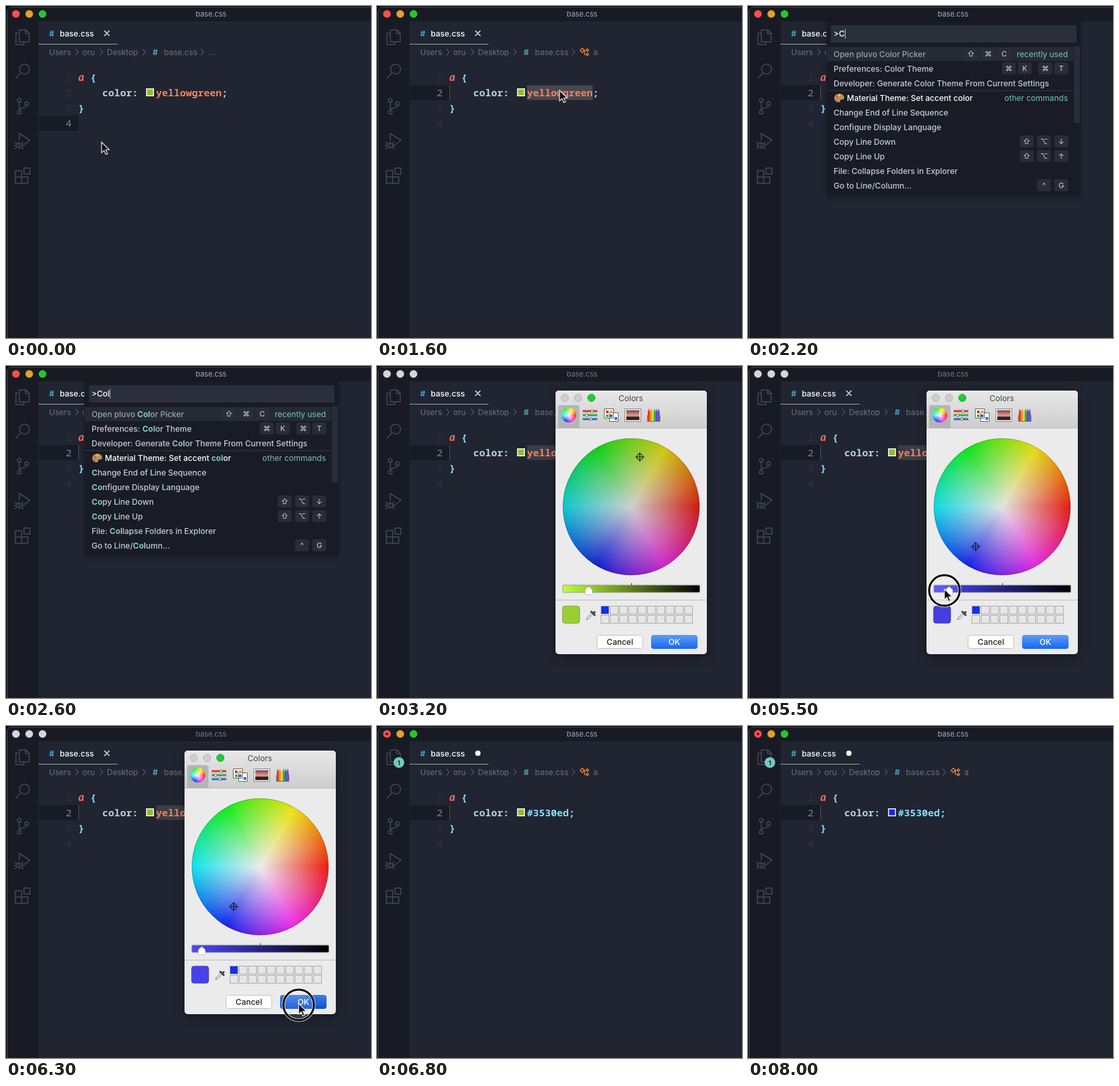
These frames come from a looping animation (550 by 500 pixels, 8.1 s). An HTML page:

```html
<!DOCTYPE html>
<html lang="en">
<head>
<meta charset="utf-8">
<title>Color picker in an editor</title>
<style>
  html, body { margin: 0; width: 100%; height: 100%; overflow: hidden; background: #000; }
  svg { display: block; }
  text { font: 12px Inter, "DejaVu Sans", sans-serif; white-space: pre; }
  .mid { text-anchor: middle; }
  .end { text-anchor: end; }
  .code text { font: 600 15px "Noto Sans Mono", "DejaVu Sans Mono", monospace; }
  .code #numbers text { font-weight: 400; }
  .code .tag { font: italic 700 17px Lato, sans-serif; }
  .crumbs { fill: #6b7185; }
  .line { fill: none; stroke-width: 1.5; stroke-linejoin: round; stroke-linecap: round; }
  .label { font-weight: 500; }
  .hit { fill: #80cbc4; font-weight: 700; }
  .plain .hit { fill: inherit; font-weight: inherit; }
  .key { font-size: 11px; fill: #d3d8e4; }
  .shadow { filter: drop-shadow(0 4px 8px rgb(0 0 0 / .35)); }
  #paletteBox { filter: drop-shadow(0 1px 3px rgb(0 0 0 / .25)); }
  .wheel {
    border-radius: 50%; width: 100%; height: 100%;
    background:
      linear-gradient(rgb(0 0 0 / var(--dark, 0)) 0 100%),
      radial-gradient(closest-side, #fff, transparent),
      conic-gradient(from 90deg, #ff1e10, #ff2cf8, #1426ff, #10f4ff, #10ff18, #fff410, #ff1e10);
  }
</style>
</head>
<body>
<svg width="550" height="500" viewBox="0 0 550 500">
  <defs>
    <linearGradient id="bar" x2="0" y2="1"><stop stop-color="#e8e8e8"/><stop offset="1" stop-color="#cdcdcd"/></linearGradient>
    <linearGradient id="ok" x2="0" y2="1"><stop stop-color="#5c9df8"/><stop offset="1" stop-color="#1967f2"/></linearGradient>
    <linearGradient id="okDown" x2="0" y2="1"><stop stop-color="#3a7ee6"/><stop offset="1" stop-color="#0c50d2"/></linearGradient>
    <linearGradient id="ramp"><stop id="rampStart"/><stop offset="1" stop-color="#000"/></linearGradient>
    <linearGradient id="sunset" x2="0" y2="1"><stop stop-color="#5d3b66"/><stop offset=".55" stop-color="#f2a07a"/><stop offset=".7" stop-color="#2b2028"/></linearGradient>
  </defs>

  <!-- editor window -->
  <path d="M1.5 510V7.500a6 6 0 0 1 6-6H560V510Z" fill="#202531" stroke="#4b4f5a"/>
  <path d="M2 500V7.500a5.500 5.500 0 0 1 5.500-5.500H550V23H49V500Z" fill="#181a24"/>
  <g id="lights"></g>
  <text id="title" class="mid" x="309" y="16" style="font-size:11px">base.css</text>

  <g class="line" stroke="#454958">
    <path d="M20 41h-5v17h12v-4M20 36h10l5 5v13h-15zM29.500 36v5.500h5.500"/>
    <circle cx="28" cy="95" r="7.500"/><path d="M22.500 100.500L15 109"/>
    <circle cx="20" cy="142" r="2.800"/><circle cx="31" cy="147" r="2.800"/><circle cx="20" cy="160" r="2.800"/>
    <path d="M20 145v12M31 150c0 5-11 2-11 7"/>
    <path d="M20 202v-10l16 10-10 8"/><circle cx="19.500" cy="210" r="4"/>
    <path d="M19.500 206v8M13 205l3 2.500M26 205l-3 2.500M12.500 210h3M23.500 210h3M13 215l3-2.500M26 215l-3-2.500"/>
    <path d="M14 248h9.500v19h-9.500zM14 257.500h19v9.500h-9.500M27 244h9v9h-9z"/>
  </g>
  <g id="badge"><circle cx="33" cy="55" r="8" fill="#72c9bf"/><text class="mid" x="33" y="58.500" fill="#16202a" style="font-size:9px;font-weight:700">1</text></g>

  <rect x="49" y="57" width="119" height="1" fill="#8fa5a6"/>
  <text x="65" y="46" fill="#4aa3c7" style="font-weight:700">#</text>
  <text x="81" y="46" fill="#fff" class="label">base.css</text>
  <path id="close" class="line" d="M148.500 37.500l7 7m0-7l-7 7" stroke="#dfe3ea"/>
  <circle id="dirty" cx="152" cy="41" r="4" fill="#fff"/>

  <g class="crumbs">
    <text x="65" y="74">Users</text><text x="115" y="74">oru</text><text x="152" y="74">Desktop</text>
    <text x="221" y="74" fill="#4aa3c7" style="font-weight:700">#</text><text x="238" y="74">base.css</text>
    <path class="line" d="M105 65l4 4.500-4 4.500M142 65l4 4.500-4 4.500M206 65l4 4.500-4 4.500M294 65l4 4.500-4 4.500" stroke="#6b7185" style="stroke-width:1"/>
    <text id="dots" x="305" y="74">...</text>
    <g id="symbol">
      <path class="line" d="M306 67l3.500-3.500 3 3-3.500 3.500zM311 67h4M312.500 67v6h2M315 66.500l2-2 2 2-2 2zM315 73l2-2 2 2-2 2z" stroke="#ee8b33" style="stroke-width:1.200"/>
      <text x="326" y="74">a</text>
    </g>
  </g>

  <g class="code">
    <rect id="current" x="50" width="59" height="23" fill="#181b25"/>
    <g id="numbers" class="end"></g>
    <rect id="guide" x="109" y="119" width="1" height="23" fill="#4b5161"/>
    <rect id="selection" x="226" y="119.500" width="99" height="22" fill="#48484d"/>
    <text class="tag" x="109" y="113" fill="#ff6a60">a</text>
    <text x="127" y="113" fill="#89ddff">{</text>
    <text x="145" y="136" fill="#b9d0dc">color<tspan fill="#89ddff">:</tspan></text>
    <rect id="chip" x="211.750" y="124.750" width="10.500" height="10.500" stroke="#f4f4f4" stroke-width="1.500"/>
    <text x="226" y="136" fill="#89ddff"><tspan id="value"></tspan>;</text>
    <text x="109" y="159" fill="#89ddff">}</text>
  </g>

  <!-- command palette -->
  <g id="palette">
    <rect id="paletteBox" x="118" y="23" width="383" fill="#191b25"/>
    <rect x="125" y="29" width="370" height="26" fill="#2b2f3c"/>
    <text class="label" x="129" y="46" fill="#fff"><tspan id="query"></tspan><tspan dx="-1" style="font-weight:300">|</tspan></text>
    <rect x="119" y="62" width="371" height="21" fill="#262a35"/>
    <g id="recent"></g>
    <g id="others">
      <rect x="119" y="127" width="371" height="1" fill="#343844"/>
      <rect x="491" y="61" width="9" height="115" fill="#2a2d39"/>
      <path d="M130 139c0-5 4-7 8-7s7 3 7 6-3 3-5 3 0 4-3 4-7-2-7-6z" fill="#c98a55"/>
      <circle cx="134" cy="137" r="1.500" fill="#e8463c"/><circle cx="138" cy="134.500" r="1.500" fill="#f6d743"/>
      <circle cx="142" cy="137" r="1.500" fill="#4fc35d"/><circle cx="134" cy="141.500" r="1.500" fill="#4a8df0"/>
    </g>
  </g>

  <!-- color panel -->
  <g id="panel">
    <rect class="shadow" x="269" y="37" width="228" height="397" rx="5" fill="#ebebeb"/>
    <path d="M269 94V42a5 5 0 0 1 5-5h218a5 5 0 0 1 5 5v52z" fill="url(#bar)"/>
    <path d="M269 93.500h228M269 352.500h228" stroke="#bcbcbc"/>
    <g fill="#cfcfcf" stroke="#b5b5b5"><circle cx="283" cy="48" r="5.500"/><circle cx="303" cy="48" r="5.500"/><circle cx="323" cy="48" r="5.500" fill="#27c83f" stroke="#1eac30"/></g>
    <text class="mid" x="382.500" y="53" fill="#444">Colors</text>

    <path d="M273 94V62a3 3 0 0 1 3-3h26a3 3 0 0 1 3 3v32z" fill="#b5b5b5"/>
    <foreignObject x="278" y="62.500" width="22" height="22"><div class="wheel"></div></foreignObject>
    <path d="M310 68h22" stroke="#d83a32" stroke-width="3"/><path d="M310 74h22" stroke="#37ad3d" stroke-width="3"/><path d="M310 80h22" stroke="#3467dc" stroke-width="3"/>
    <g fill="#fff" stroke="#666"><circle cx="324" cy="68" r="2"/><circle cx="316" cy="74" r="2"/><circle cx="322" cy="80" r="2"/>
      <path d="M350.500 70.500h13v13h-13zM342.500 64.500h14v14h-14z"/></g>
    <path d="M345 67h4v4h-4z" fill="#e0332c"/><path d="M351 67h4v4h-4z" fill="#f0a128"/><path d="M345 73h4v4h-4z" fill="#35b23f"/><path d="M351 73h4v4h-4zM358 77h4v4h-4z" fill="#3465d8"/>
    <rect x="374.500" y="65.500" width="22" height="17" fill="url(#sunset)" stroke="#fff" stroke-width="2"/><rect x="373.500" y="64.500" width="24" height="19" fill="none" stroke="#888"/>
    <g id="pencils"></g>

    <foreignObject x="280" y="109" width="206" height="206"><div id="wheel" class="wheel"></div></foreignObject>
    <circle cx="383" cy="212" r="102.750" fill="none" stroke="#0005" stroke-width=".7"/>
    <g id="cross" fill="none" stroke="#10131c" stroke-width="1.200"><circle r="4.500"/><path d="M-7 0H7M0-7V7"/></g>

    <rect x="280" y="330" width="206.500" height="11" rx="1.500" fill="url(#ramp)" stroke="#999"/>
    <path d="M383.500 327v3" stroke="#333"/>
    <path id="thumb" d="M0 332l5.500 5v6a1.500 1.500 0 0 1-1.500 1.500h-8a1.500 1.500 0 0 1-1.500-1.500v-6z" fill="#fff" stroke="#8888" stroke-width=".8"/>
    <rect id="well" x="279.500" y="361.500" width="26" height="26" rx="4" stroke="#0004"/>
    <path class="line" d="M316 381.500l1-3 7-7 2 2-7 7z" fill="#ddd" stroke="#777" style="stroke-width:1"/><path class="line" d="M323 370l5 5M326 372.500l2-2" stroke="#444" style="stroke-width:3"/>
    <g id="cells" stroke="#adadad"></g>
    <rect x="331.500" y="405.500" width="69" height="20" rx="4" fill="#fff" stroke="#c2c2c2"/>
    <text class="mid label" x="366" y="420" fill="#222">Cancel</text>
    <rect id="confirm" x="413" y="405" width="70" height="21" rx="4"/>
    <text class="mid label" x="448" y="420" fill="#fff">OK</text>
  </g>

  <g id="pointer">
    <g id="ring" fill="none"><circle cy="2" r="23" fill="#ffffff1c" stroke="#ffffffc0" stroke-width="5"/><circle cy="2" r="23" stroke="#000" stroke-width="3"/></g>
    <path d="M0 0V16L3.800 12.500 6.300 18.500 9 17.400 6.500 11.500H11.500Z" fill="#08090d" stroke="#e6e6e6" stroke-width="1.200"/>
  </g>
</svg>

<script>
const LOOP = 8100, STEP = 100;
const $ = id => document.getElementById(id);
const set = (id, attrs) => { for (const k in attrs) $(id).setAttribute(k, attrs[k]); };
const show = (id, on) => { $(id).style.display = on ? '' : 'none'; };
const range = n => [...Array(n).keys()];

// Static repeated parts
$('lights').innerHTML = range(3).map(i => `<circle cx="${15 + 20 * i}" cy="12" r="5.800"/>`).join('') +
  '<circle id="unsaved" cx="15" cy="12" r="2" fill="#5c0c08"/>';
$('numbers').innerHTML = range(4).map(i => `<text x="99" y="${113 + 23 * i}">${i + 1}</text>`).join('');
$('cells').innerHTML = range(20).map(i =>
  `<rect x="${337.5 + 14 * (i % 10)}" y="${i < 10 ? 361.5 : 375.5}" width="12" height="12" fill="${i ? '#e6e6e6' : '#1230f2'}"/>`).join('');
$('pencils').innerHTML = ['#e23a30', '#f08c28', '#f0d22c', '#38b044', '#3560d8', '#8d45b8'].map((c, i) =>
  `<path d="M${408 + 3 * i} 83V69l1.500-5 1.500 5v14z" fill="${c}"/>`).join('') +
  '<path d="M407.500 74v9.500h19V74" fill="none" stroke="#777"/>';

// Matched letters stand between asterisks; keys are [center x, label].
const rows = [
  ['Open pluvo *Col*or Picker', 'recently used', [[336, '⇧'], [362, '⌘'], [386, 'C']]],
  ['Preferences: *Col*or Theme', '', [[393, '⌘'], [417, 'K'], [448, '⌘'], [472, 'T']]],
  ['Developer: Generate *Col*or Theme From Current Settings'],
  ['Material Theme: Set accent *col*or', 'other commands'],
  ['*C*hange End *o*f *L*ine Sequence'],
  ['*Co*nfigure Display *L*anguage'],
  ['*Co*py *L*ine Down', '', [[420, '⇧'], [446, '⌥'], [472, '↓']]],
  ['*Co*py *L*ine Up', '', [[420, '⇧'], [446, '⌥'], [472, '↑']]],
  ['File: *Col*lapse Folders in Explorer'],
  ['Go to Line/*Col*umn...', '', [[446, '^'], [472, 'G']]],
];
rows.forEach(([label, note = '', keys = []], i) => {
  const y = 72 + 22 * i, accent = i === 3;
  const color = accent ? '#fff' : i ? '#c6ccd9' : '#9aa2b2';
  const marked = label.replace(/\*(.+?)\*/g, '<tspan class="hit">$1</tspan>');
  $(i < 3 ? 'recent' : 'others').innerHTML +=
    `<text class="label" x="${accent ? 149 : 129}" y="${y + 4.5}" fill="${color}">${marked}</text>` +
    `<text class="end" x="482" y="${y + 4.5}" fill="#78c4bd">${note}</text>` +
    keys.map(([x, k]) => `<rect x="${x - 10.5}" y="${y - 9}" width="21" height="18" rx="3" fill="#2a2d38"/>
      <text class="mid key" x="${x}" y="${y + 4}">${k}</text>`).join('');
});

// Keyframes are [time, ...values], eased between neighbours.
function track(keys, t) {
  const i = keys.findIndex(k => k[0] > t);
  if (i === 0) return keys[0].slice(1);
  if (i < 0) return keys.at(-1).slice(1);
  const [a, b] = [keys[i - 1], keys[i]];
  const p = (t - a[0]) / (b[0] - a[0]), e = p * p * (3 - 2 * p);
  return a.slice(1).map((v, j) => v + (b[j + 1] - v) * e);
}
const pointerPath = [
  [0, 144, 205], [800, 275, 127], [3500, 275, 127], [4200, 346, 272], [4400, 343, 272],
  [4500, 343, 272], [5200, 319, 336], [5300, 319, 336], [5500, 296, 336], [5700, 295, 336], [6200, 441, 418],
];
const thumbPath = [[5300, 319], [5500, 303], [5600, 295]];
const presses = [[800, 900], [1000, 1100], [4200, 4500], [5300, 5700], [6200, 6400]];

function hsv(h, s, v) {
  const f = n => { const k = (n + h / 60) % 6; return 255 * v * (1 - s * Math.max(0, Math.min(k, 4 - k, 1))); };
  return `rgb(${f(5)} ${f(3)} ${f(1)})`;
}

function draw(t) {
  const during = (a, b) => t >= a && t < b;
  const line = t < 800 ? 4 : 2, edited = t >= 6700, inactive = during(3000, 6500);

  // Editor
  [...$('lights').children].slice(0, 3).forEach((c, i) =>
    c.setAttribute('fill', inactive ? '#d3d6da' : ['#f9514a', '#e0a126', '#24c72f'][i]));
  set('title', { fill: inactive ? '#747b8e' : '#a5adc2' });
  set('current', { y: 73 + 23 * line });
  [...$('numbers').children].forEach((n, i) => n.setAttribute('fill', i + 1 === line ? '#7b8299' : '#303541'));
  for (const id of ['badge', 'dirty', 'unsaved']) show(id, edited);
  show('close', !edited);
  show('dots', line === 4);
  show('symbol', line === 2);
  show('guide', line === 2);
  show('selection', t >= 1000 && !edited);
  set('selection', { fill: inactive ? '#3c3d44' : '#48484d' });
  $('value').textContent = edited ? '#3530ed' : 'yellowgreen';
  set('value', { fill: edited ? '#89ddff' : '#f7805e' });
  set('chip', { fill: t >= 7400 ? '#1428ee' : '#90bb30' });

  // Command palette
  show('palette', during(1700, 2900));
  show('others', t >= 2000);
  set('paletteBox', { height: t >= 2000 ? 264 : 105 });
  const query = '>Col'.slice(0, t < 2200 ? 1 : t < 2400 ? 2 : t < 2600 ? 3 : 4);
  $('query').textContent = query;
  $('palette').classList.toggle('plain', query !== '>Col');

  // Color panel
  const fade = Math.max(0, Math.min(1, (t - 2900) / 200, (6500 - t) / 200));
  show('panel', fade > 0);
  set('panel', { opacity: fade });
  const [px, py] = track(pointerPath, t), [thumb] = track(thumbPath, t);
  const picked = t >= 4200, value = 1 - (thumb - 280) / 206;
  const [hue, sat] = picked ? [241, .72] : [80, .76];
  const [cx, cy] = !picked ? [396, 137] : t < 4500 ? [px - 1, py - 1] : [343, 272];
  $('wheel').style.setProperty('--dark', 1 - value);
  set('cross', { transform: `translate(${cx} ${cy})` });
  set('thumb', { transform: `translate(${thumb} 0)` });
  set('rampStart', { 'stop-color': hsv(hue, sat, 1) });
  set('well', { fill: hsv(hue, sat, value) });
  set('confirm', { fill: during(6200, 6500) ? 'url(#okDown)' : 'url(#ok)' });

  // Pointer
  show('pointer', t < 1800 || during(3500, 6700));
  show('ring', presses.some(([a, b]) => during(a, b)));
  set('pointer', { transform: `translate(${px} ${py})` });
}

function tick() {
  draw(Math.floor(performance.now() % LOOP / STEP) * STEP);
  requestAnimationFrame(tick);
}
tick();
</script>
</body>
</html>
```
